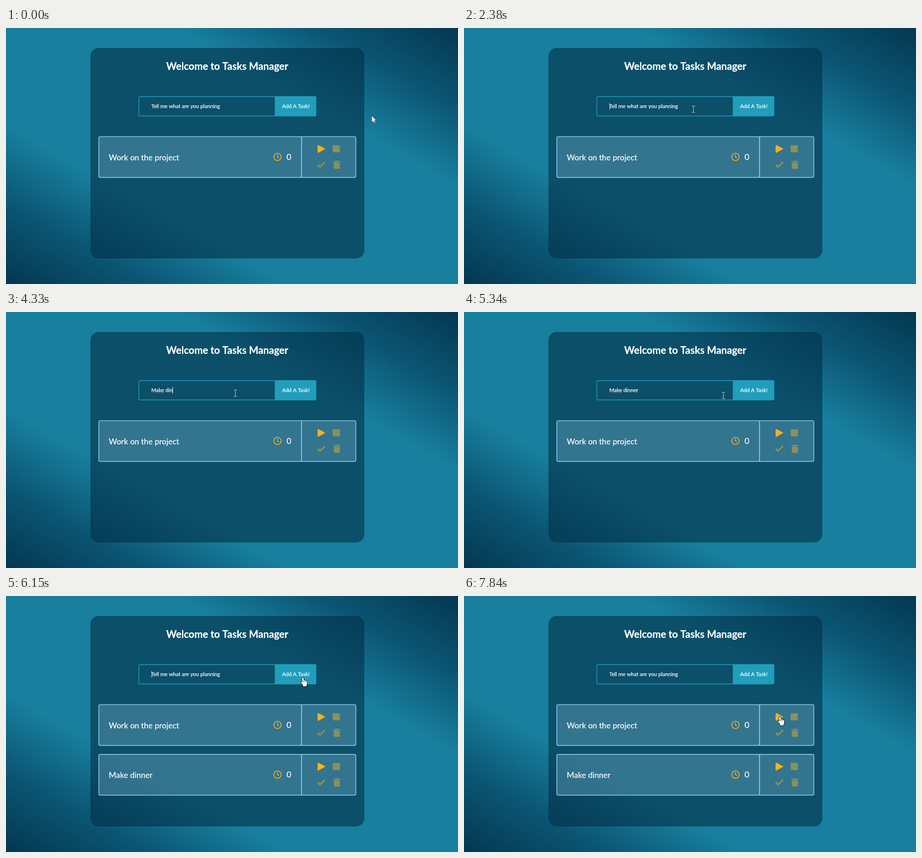
These frames come from a looping animation (994x563 px, 8000 ms). An HTML page with a canvas:

```html
<!DOCTYPE html>
<html lang="en">
<head>
<meta charset="utf-8">
<title>Tasks Manager</title>
<style>
  html, body { margin: 0; width: 100%; height: 100%; overflow: hidden; background: #187f9e; }
  canvas { display: block; width: 994px; height: 563px; }
</style>
</head>
<body>
<canvas id="stage" width="994" height="563"></canvas>
<script>
const ctx = document.getElementById('stage').getContext('2d');
const W = 994, H = 563, LOOP = 8000;
const PLACEHOLDER = 'Tell me what are you planning';
const TASK = 'Make dinner';
const FOCUS = 1290, BLUR = 5830, ADD = 6120, BLINK = 510;
const LINE = '#8bc7e3', OLIVE = '#8a9157', BLUE = '#219ebc';

const START = [804, 193];
const MOVES = [
  { at: 450, until: 880, to: [495, 193] },
  { at: 880, until: 1240, to: [474, 178] },
  { at: 1770, until: 2330, to: [504, 178] },
  { at: 5090, until: 5630, to: [652, 189] },
  { at: 5790, until: 6020, to: [653, 179] },
  { at: 6150, until: 6470, to: [631, 167] },
  { at: 7070, until: 7820, to: [695, 265] }
];

const keyTime = i => 3130 + 163 * i - 55 * Math.sin(i * Math.PI / 5);
const ease = u => u * u * (3 - 2 * u);
const clamp = u => Math.min(1, Math.max(0, u));

// Corner-to-corner gradient whose middle line is the other diagonal.
function backdrop() {
  const reach = W * H / (W * W + H * H), dx = H * reach, dy = W * reach;
  const g = ctx.createLinearGradient(W / 2 - dx, H / 2 + dy, W / 2 + dx, H / 2 - dy);
  [[0, '#043750'], [.16, '#0b5674'], [.31, '#187f9e']].forEach(([stop, color]) => {
    g.addColorStop(stop, color);
    g.addColorStop(1 - stop, color);
  });
  return g;
}
const BACKDROP = backdrop();

function text(str, x, y, size, { weight = 400, align = 'left' } = {}) {
  ctx.font = `${weight} ${size}px Lato, sans-serif`;
  ctx.textAlign = align;
  ctx.fillStyle = ctx.strokeStyle = '#fff';
  ctx.lineWidth = .25;
  ctx.fillText(str, x, y);
  ctx.strokeText(str, x, y);
}

function box(x, y, w, h, radius, fill, border, lineWidth = 1.7) {
  ctx.beginPath();
  ctx.roundRect(x, y, w, h, radius);
  if (fill) { ctx.fillStyle = fill; ctx.fill(); }
  if (border) { ctx.strokeStyle = border; ctx.lineWidth = lineWidth; ctx.stroke(); }
}

function polyline(points, color, width) {
  ctx.beginPath();
  points.forEach(p => ctx.lineTo(...p));
  ctx.strokeStyle = color;
  ctx.lineWidth = width;
  ctx.stroke();
}

function clock(x, y, color) {
  ctx.beginPath();
  ctx.arc(x, y, 8.1, 0, Math.PI * 2);
  ctx.strokeStyle = color;
  ctx.lineWidth = 1.8;
  ctx.stroke();
  polyline([[x, y - 4.8], [x, y], [x + 3.2, y + 2.2]], color, 1.8);
}

function play(x, y, color) {
  ctx.lineJoin = 'round';
  polyline([[x, y - 7.6], [x, y + 7.6], [x + 14, y], [x, y - 7.6]], color, 2.4);
  ctx.fillStyle = color;
  ctx.fill();
}

function trash(x, y, color) {
  box(x - 2.5, y, 5, 2, 1, color);
  box(x - 7.7, y + 1.3, 15.4, 2.3, .6, color);
  box(x - 6.7, y + 4.6, 13.4, 13.6, [0, 0, 2, 2], color);
}

function taskRow(dy, label, amber) {
  ctx.save();
  ctx.translate(0, dy);
  box(203.5, 238.3, 566.5, 91, 3, 'rgba(142,202,230,.3)');
  box(204.2, 239, 445.7, 89.6, 3, null, LINE);
  box(649.9, 239, 119.5, 89.6, [0, 3, 3, 0], null, LINE);
  text(label, 226, 290.5, 17.55);
  text('0', 617, 290, 18);
  clock(597, 283.5, amber);
  play(686.4, 265.8, amber);
  box(718.3, 258, 16, 15.6, 2, OLIVE);
  ctx.lineJoin = 'miter';
  polyline([[685.3, 300.6], [690.4, 305.4], [701.6, 295]], OLIVE, 3.6);
  trash(727.5, 291.5, OLIVE);
  ctx.restore();
}

function squiggle(x, width) {
  ctx.fillStyle = '#c23350';
  for (let i = 0; i < width; i += 2) ctx.fillRect(x + i, 177 + (i / 2 % 2), 1.6, 1);
}

// The caret restarts its blink whenever the field is focused or typed in.
function caretVisible(t, keys) {
  if (t < FOCUS || (t >= BLUR && t < ADD)) return false;
  const since = t >= ADD ? ADD : keys ? keyTime(keys - 1) : FOCUS;
  return Math.floor((t - since) / BLINK) % 2 === 0;
}

function field(t) {
  const keys = [...TASK].filter((_, i) => keyTime(i) <= t).length;
  const typed = t < ADD ? TASK.slice(0, keys) : '';
  box(591, 150, 91.3, 44.2, [0, 3, 3, 0], BLUE);
  box(292.2, 150.9, 299.6, 42.4, [3, 0, 0, 3], null, '#1f96b4');
  text('Add A Task!', 637.4, 176, 11.7, { align: 'center' });
  text(typed || PLACEHOLDER, 319.5, 176, 11.62);
  if (typed.length > 4 && t < BLUR) squiggle(320, 28);
  if (caretVisible(t, keys)) {
    ctx.fillStyle = '#fff';
    ctx.fillRect(Math.round(319.5 + ctx.measureText(typed).width), 165, 1, 14);
  }
}

function pointerAt(t) {
  return MOVES.reduce(([x, y], { at, until, to }) => {
    const e = ease(clamp((t - at) / (until - at)));
    return [x + (to[0] - x) * e, y + (to[1] - y) * e];
  }, START).map(Math.round);
}

function beam() {
  ctx.fillStyle = '#ddd5d0';
  ctx.fillRect(0, -6, 1, 13);
  for (const y of [-7, 7]) {
    ctx.fillRect(-3, y, 3, 1);
    ctx.fillRect(1, y, 3, 1);
  }
}

function arrow() {
  polyline([[.5, .5], [.5, 13.7], [3.6, 11], [5.7, 15.8], [7.8, 14.9], [5.8, 10.3], [9.8, 10.3], [.5, .5]], '#111', 1);
  ctx.fillStyle = '#fff';
  ctx.fill();
}

function hand() {
  ctx.beginPath();
  for (let i = 0; i < 4; i++) ctx.roundRect(-1.5 + 2.5 * i, i ? 5.4 + .6 * i : 0, 3, 9, 1.5);
  ctx.roundRect(-1.5, 9, 10.5, 7, 2);
  ctx.roundRect(0, 12, 8, 7.5, 1);
  ctx.moveTo(-5, 10.5);
  ctx.lineTo(-1.5, 9.5);
  ctx.lineTo(1.5, 18);
  ctx.closePath();
  ctx.strokeStyle = '#111';
  ctx.lineWidth = 1.8;
  ctx.stroke();
  ctx.fillStyle = '#fff';
  ctx.fill();
  for (let i = 0; i < 3; i++) polyline([[1.3 + 2.5 * i, 7 + i / 2], [1.3 + 2.5 * i, 10.5]], '#333', .8);
}

function pointer(t) {
  const [x, y] = pointerAt(t);
  const inside = (left, top, right, bottom) => x >= left && x <= right && y >= top && y <= bottom;
  const overInput = inside(292, 150, 591, 194);
  const clickable = inside(592, 150, 682, 194) || inside(685, 256, 702, 275);
  ctx.save();
  ctx.translate(x, y);
  ctx.lineJoin = 'round';
  (overInput ? beam : clickable ? hand : arrow)();
  ctx.restore();
}

function draw(t) {
  ctx.fillStyle = BACKDROP;
  ctx.fillRect(0, 0, W, H);
  box(185.7, 44, 602.3, 462.7, 18, 'rgba(2,48,71,.6)');
  text('Welcome to Tasks Manager', 486.5, 92.3, 22, { weight: 700, align: 'center' });
  field(t);
  taskRow(0, 'Work on the project', '#f6af20');
  if (t >= ADD) taskRow(109.3, TASK, '#ffb508');
  pointer(t);
}

function frame(now) {
  draw(now % LOOP);
  requestAnimationFrame(frame);
}
requestAnimationFrame(frame);
</script>
</body>
</html>
```
